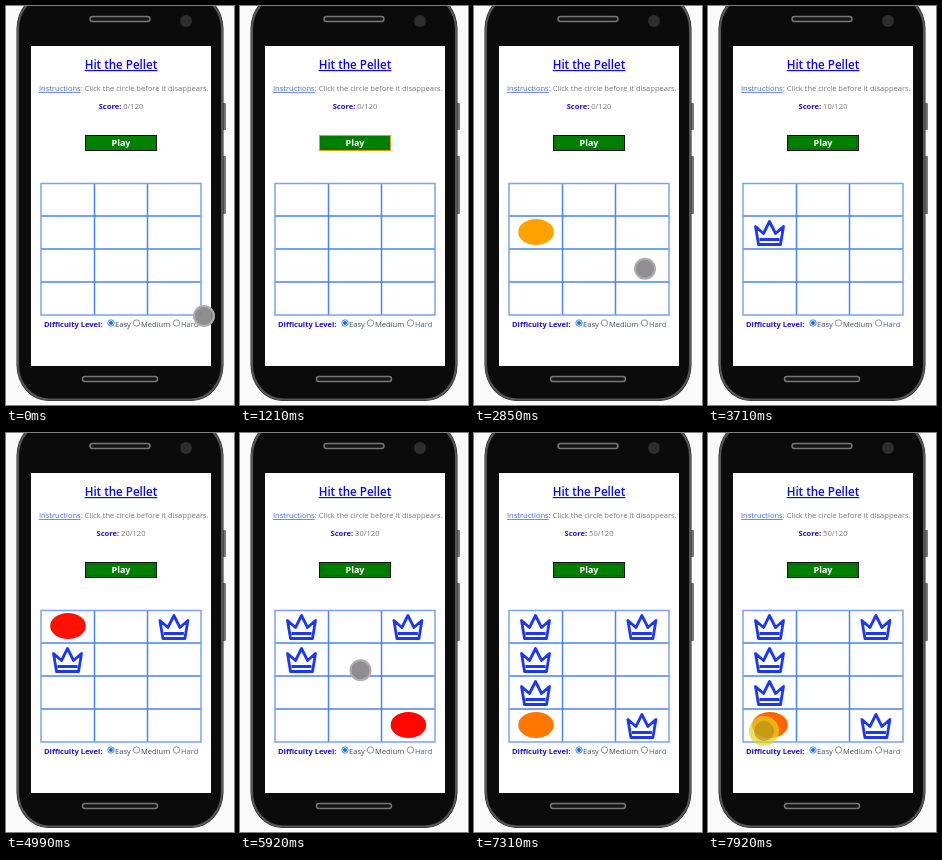
Recreate the animation shown at these times as an HTML page. Size 228 px wide and 399 px high, loop 8 s.

```html
<!DOCTYPE html>
<html lang="en">
<head>
<meta charset="utf-8">
<style>
  html, body { margin: 0; width: 100%; height: 100%; overflow: hidden; background: #fafafa; }
  svg { display: block; width: 228px; height: 399px; }
  text { font: 7.55px "Open Sans", "Noto Sans", sans-serif; fill: #777; white-space: pre; }
  .bold { font-weight: 700; fill: #1c10d8; }
  .link { fill: #4468d8; text-decoration: underline; }
  .title { font-size: 11.6px; font-weight: 600; fill: #0808e8; text-decoration: underline; }
  .play { font-size: 9px; font-weight: 700; fill: #fff; }
  .mid { text-anchor: middle; }
  .opt { fill: #3c4a66; }
</style>
</head>
<body>
<svg viewBox="0 0 228 399">
  <defs>
    <path id="crown" d="M-11 12H11L14-6L6 1L0-11L-6 1L-14-6ZM-10 7H10"
          fill="none" stroke="#1c38f4" stroke-width="2.8" stroke-linejoin="round"/>
  </defs>

  <!-- phone -->
  <g fill="#777">
    <rect x="216" y="97" width="4" height="27" rx="1"/>
    <rect x="216" y="150" width="4" height="58" rx="1"/>
  </g>
  <rect x="10.5" y="-13" width="207" height="408" rx="32" ry="36" fill="#222"/>
  <rect x="12" y="-11.5" width="204" height="405" rx="31" ry="35" fill="#0b0b0b" stroke="#565656" stroke-width="2"/>
  <g fill="#161616" stroke="#777" stroke-width="1.4">
    <rect x="84" y="10.5" width="60" height="5" rx="2.5"/>
    <rect x="76.5" y="370.5" width="75" height="5" rx="2.5"/>
  </g>
  <circle cx="180" cy="15" r="6" fill="#2e2e2e"/>
  <rect x="25" y="40" width="180" height="320" fill="#fff"/>

  <!-- page -->
  <text x="115" y="63" class="title mid">Hit the Pellet</text>
  <text x="33" y="85"><tspan class="link">Instructions</tspan>: Click the circle before it disappears.</text>
  <text x="115" y="103" class="mid"><tspan class="bold">Score:</tspan> <tspan id="score"></tspan></text>
  <rect id="button" x="79.5" y="129.5" width="71" height="15" fill="#008000"/>
  <rect id="focus" x="81.5" y="131.5" width="67" height="11" fill="none" stroke="#021" stroke-opacity=".4" stroke-dasharray="1 1"/>
  <text x="115" y="140" class="play mid">Play</text>
  <g fill="none" stroke-width="1.5">
    <path d="M35 210H195M35 243H195M35 276H195M88.5 177V309M141.5 177V309" stroke="#4a84f0"/>
    <path d="M35 177.5H195V309H35Z" stroke="#7ba2f2"/>
  </g>
  <text x="38" y="321" class="bold">Difficulty Level:</text>
  <text x="109" y="321" class="opt">Easy</text>
  <text x="135" y="321" class="opt">Medium</text>
  <text x="175" y="321" style="fill:#3868a8">Hard</text>
  <g fill="#fff" stroke="#777" stroke-width=".8">
    <circle cx="105" cy="317" r="3.2" stroke="#1a6fe0"/>
    <circle cx="130.5" cy="317" r="3.2"/>
    <circle cx="170.5" cy="317" r="3.2"/>
  </g>
  <circle cx="105" cy="317" r="2" fill="#1a6fe0"/>

  <g id="crowns"></g>
  <ellipse id="dot" rx="17.8" ry="13"/>
  <g id="cursor">
    <circle id="halo" fill="#e6d21e" fill-opacity=".7"/>
    <circle id="tip" r="10" stroke-width="2"/>
  </g>
</svg>
<script>
const LOOP = 8000, FIRST = 1981, SLOT = 868, FADE = 450;
const ARRIVE = .72, CAUGHT = .977; // shares of a slot
const $ = id => document.getElementById(id);
const set = (el, attrs) => { for (const k in attrs) el.setAttribute(k, attrs[k]); };
const show = (el, on) => set(el, { visibility: on ? 'visible' : 'hidden' });
const clamp = v => Math.max(0, Math.min(1, v));

// column, row and the share of the slot after which the cursor is seen
const rounds = [
  [2, 2, .5], [0, 1, 0], [2, 0, .47], [0, 0, .5], [2, 3, .47], [0, 2, 0], [0, 3, .4]
].map(([col, row, wake], i) => ({
  x: 62 + 53.2 * col, y: 193 + 33 * row,
  aim: [56 + 57.5 * col, 193 + 35 * row],
  wake, end: i ? CAUGHT : 1 // the first circle is missed
}));

for (const r of rounds.slice(1)) {
  r.crown = document.createElementNS('http://www.w3.org/2000/svg', 'use');
  set(r.crown, { href: '#crown', x: r.x - .5, y: r.y + .5 });
  $('crowns').append(r.crown);
}

// speeds up along a path that bows upwards
function travel([x0, y0], [x1, y1], share) {
  const u = clamp(share), e = u * u;
  const bow = .18 * Math.abs(x1 - x0) * Math.sin(Math.PI * u);
  return [x0 + (x1 - x0) * e, y0 + (y1 - y0) * e - bow];
}

function drawCursor(at, press) {
  const down = press > 0;
  set($('cursor'), { transform: `translate(${at})` });
  set($('halo'), { r: down ? 11 + 4 * clamp(press) : 0 });
  set($('tip'), down ? { fill: '#a88c10', 'fill-opacity': .6, stroke: 'none' }
                     : { fill: '#8a888a', 'fill-opacity': .95, stroke: '#b0aeb0' });
}

function draw(t) {
  const pos = (t - FIRST) / SLOT, n = Math.floor(pos), p = pos - n;
  const live = rounds[n];
  const open = live && p < live.end;

  let score = 0;
  rounds.forEach((r, i) => {
    const won = r.crown && pos >= i + r.end;
    if (won) score += 10;
    if (r.crown) show(r.crown, won);
  });
  $('score').textContent = score + '/120';

  set($('button'), { stroke: t >= 1070 && n < 1 ? '#e69a10' : '#111' });
  show($('focus'), t >= 1070);

  show($('dot'), open);
  if (open) {
    // orange to red and back
    const warm = Math.abs(1 - p * SLOT / FADE);
    set($('dot'), { cx: live.x, cy: live.y, fill: `rgb(255,${Math.round(163 * warm)},0)` });
  }

  show($('cursor'), open ? p >= live.wake : t < 1190);
  if (open) {
    const from = (rounds[n - 1] || live).aim;
    const press = p < .92 ? (p - ARRIVE) / .1 : 0;
    drawCursor(travel(from, live.aim, p / ARRIVE), press);
  } else {
    drawCursor(travel([198, 310], [135, 135], (t - 70) / 520), t < 1070 ? (t - 750) / 150 : 0);
  }
}

const start = performance.now();
(function tick() {
  draw((performance.now() - start) % LOOP);
  requestAnimationFrame(tick);
})();
</script>
</body>
</html>
```
